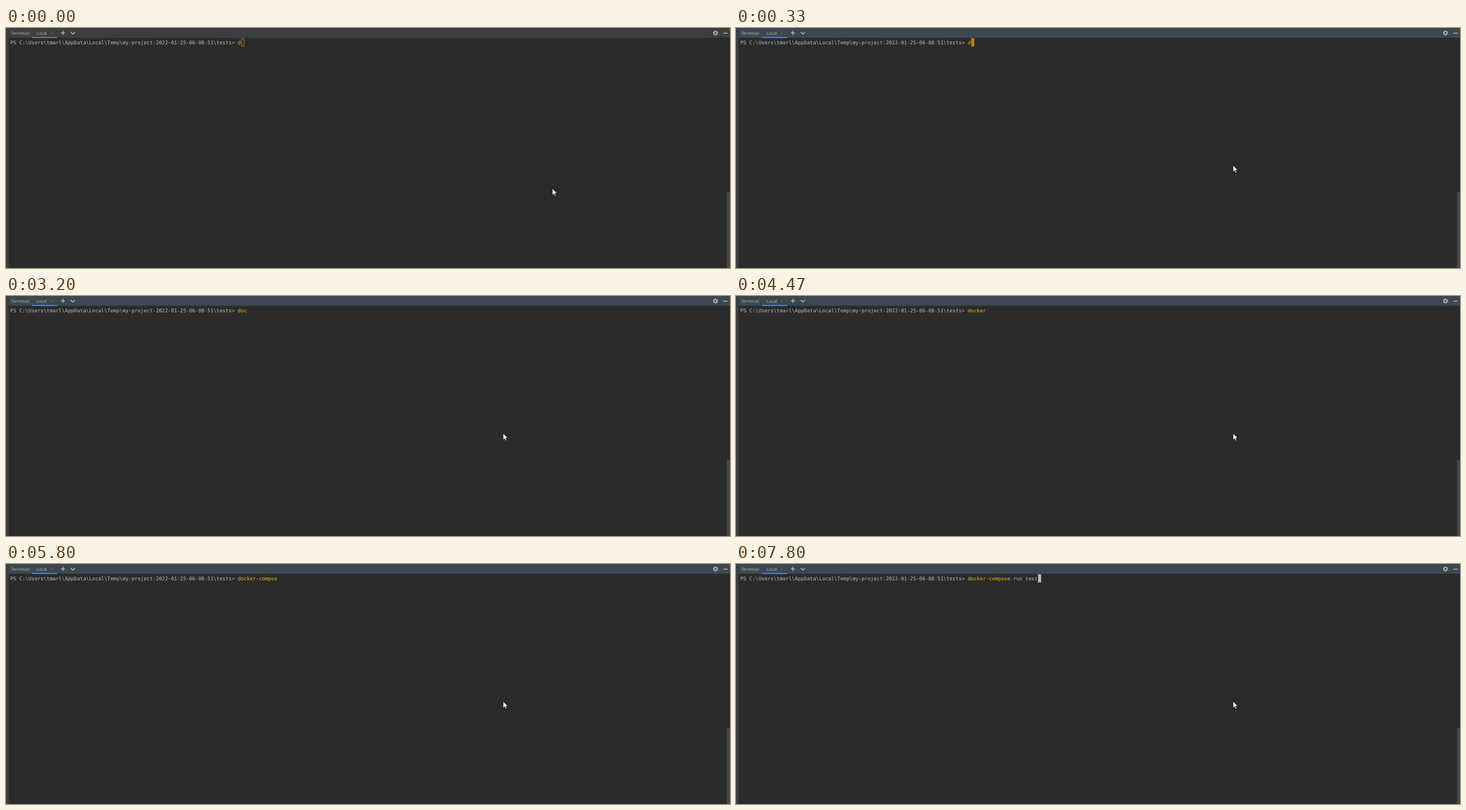
An HTML page that plays this animation: 1280x426 px, repeating every 8 s.

```html
<!DOCTYPE html>
<html lang="en">
<head>
<meta charset="utf-8">
<title>Terminal</title>
<style>
  html, body { margin: 0; width: 100%; height: 100%; overflow: hidden; background: #2b2b2b; }
  svg { display: block; width: 1280px; height: 426px; }
  text { white-space: pre; text-rendering: geometricPrecision; }
  .ui { font: 7.7px "Open Sans", "Noto Sans", sans-serif; fill: #bbbbbb; }
  .mono { font: 8.925px "DejaVu Sans Mono", "Noto Sans Mono", monospace; fill: #bbbbbb; }
  .icon { fill: none; stroke: #c4c7c9; stroke-width: 1.3; }
</style>
</head>
<body>
<svg viewBox="0 0 1280 426">
  <rect width="1280" height="426" fill="#2b2b2b"/>
  <rect id="header" x="4.5" width="1276" height="17.3"/>
  <rect width="4.6" height="426" fill="#3c3f41"/>
  <rect x="1274.5" y="291" width="5.5" height="135" fill="#474848"/>

  <text class="ui" x="9" y="12">Terminal:</text>
  <text class="ui" x="54" y="12">Local</text>
  <path d="M79 7.5l3.6 3.6m0-3.6l-3.6 3.6" fill="none" stroke="#686d70" stroke-width=".8"/>
  <rect id="underline" x="46" y="15.8" width="44.5" height="2"/>
  <path class="icon" d="M97 8.7h7.4M100.7 5v7.4"/>
  <path class="icon" d="M114.4 7.2l3.8 3.6 3.8-3.6"/>
  <circle class="icon" cx="1254.3" cy="8.9" r="2.5" stroke-width="1.7"/>
  <circle class="icon" cx="1254.3" cy="8.9" r="3.9" stroke-width="1.5" stroke-dasharray="2.04 2.04"/>
  <path class="icon" d="M1268 9.2h8"/>

  <rect id="caret" y="18.2" height="14.6"/>
  <text class="mono" x="7.5" y="28.8">PS C:\Users\tmarl\AppData\Local\Temp\my-project-2022-01-25-06-08-51\tests<tspan id="prompt">&gt;</tspan> <tspan id="command"></tspan><tspan id="args"></tspan></text>
  <path id="pointer" d="M0 0V11.4L2.6 9 4.3 12.9 6.2 12.1 4.5 8.3H8Z" fill="#fff" stroke="#1b1b1b" stroke-width=".7"/>
</svg>
<script>
const LOOP = 8000;
const LEFT = 7.5, CELL = 5.373, PROMPT_COLS = 75;
const LINE = "docker-compose run test";
const COMMAND_LENGTH = 14;
const FOCUS_AT = 330;

const GRAY = { text: "#bbbbbb", caret: "#bbbbbb" };
const YELLOW = { text: "#e5bf00", caret: "#b5860d" };
const GREEN = { text: "#4fc414", caret: "#3f9a14" };

// [time, typed characters, caret shown]
const TYPING = [
  [0, 1, 1], [800, 1, 0], [1400, 2, 1], [1600, 3, 1],
  [2130, 3, 0], [2670, 3, 1], [3200, 3, 0],
  [3270, 4, 1], [3400, 5, 1], [3470, 6, 1], [4470, 6, 0],
  [4530, 7, 1], [4600, 8, 1], [5000, 9, 1], [5200, 10, 1], [5330, 11, 1],
  [5530, 12, 1], [5600, 13, 1], [5800, 13, 0], [5870, 14, 1], [6000, 15, 1],
  [6530, 15, 0], [6600, 16, 1], [6800, 17, 1], [6930, 18, 1], [7070, 19, 1],
  [7470, 20, 1], [7530, 21, 1], [7730, 22, 1], [7800, 23, 1]
];

// [time, x, y]
const POINTER = [
  [0, 966, 285], [70, 948, 276], [130, 922, 263], [200, 895, 250], [270, 879, 244]
];

const el = id => document.getElementById(id);
const [header, underline, caret, prompt, command, args, pointer] =
  ["header", "underline", "caret", "prompt", "command", "args", "pointer"].map(el);

const stepAt = (steps, t) => steps.findLast(step => step[0] <= t);

function set(node, attrs) {
  for (const name in attrs) node.setAttribute(name, attrs[name]);
}

function drawCaret(count, shown, focused, color) {
  const inset = focused ? 0 : 0.5;
  set(caret, {
    x: LEFT + (PROMPT_COLS + count) * CELL + inset,
    y: 18.2 + inset,
    width: CELL - 2 * inset,
    height: 14.6 - 2 * inset,
    fill: focused ? color : "none",
    stroke: focused ? "none" : color,
    visibility: shown ? "visible" : "hidden"
  });
}

function draw(t) {
  const focused = t >= FOCUS_AT;
  const [, count, shown] = stepAt(TYPING, t);
  const [, x, y] = stepAt(POINTER, t);
  const typed = LINE.slice(0, count);
  const keyword = typed === "do"; // an unfinished loop marks the prompt as an error
  const style = keyword ? GREEN : YELLOW;

  set(header, { fill: focused ? "#3c4752" : "#3c3f41" });
  set(underline, { fill: focused ? "#4a88c7" : "#747a80" });
  set(prompt, { fill: keyword ? "#f0524f" : GRAY.text });
  set(command, { fill: style.text });
  command.textContent = typed.slice(0, COMMAND_LENGTH);
  args.textContent = typed.slice(COMMAND_LENGTH);
  drawCaret(count, shown, focused, (count > COMMAND_LENGTH ? GRAY : style).caret);
  set(pointer, { transform: `translate(${x} ${y})` });
}

const start = performance.now();
function tick() {
  draw((performance.now() - start) % LOOP);
  requestAnimationFrame(tick);
}
tick();
</script>
</body>
</html>
```
